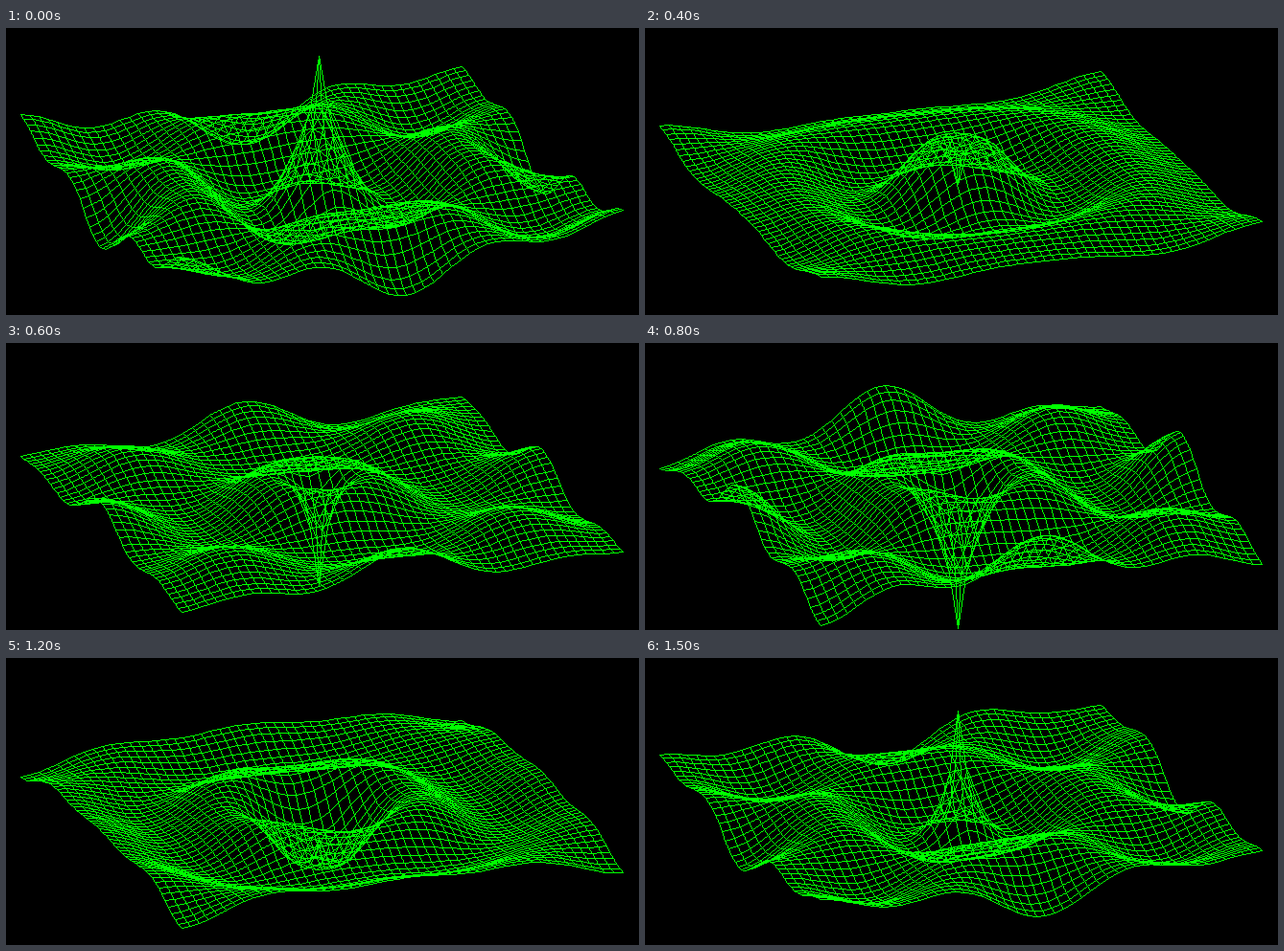
Write a matplotlib script that moves like this. It is 660 px wide and 300 px high and loops after 1600 ms.

```python
import numpy as np
import matplotlib.pyplot as plt
from matplotlib.animation import FuncAnimation

W, H = 660, 300
FRAMES, INTERVAL = 16, 100
N = 50                      # mesh points per side
CELL = 10                   # mesh spacing in pixels
CENTRE = (326, 163.5)       # screen position of the driven point
ANGLE = np.radians(20)      # both the turn and the tilt of the view
HEIGHT = 135
PHASE, STEP = 0.09, 0.37    # radians: start and advance per frame
K2 = 0.1471                 # squared wave number
LOSS_IN, LOSS_QUARTER = 0.0166, 0.037
SRC = (24, 25)


def driven_field(loss):
    """Complex amplitude of a damped square membrane driven at one point."""
    m = np.arange(N)
    modes = np.cos(np.pi * np.outer(m + 0.5, m) / N) * np.sqrt(2 / N)
    modes[:, 0] /= np.sqrt(2)
    lam = 2 - 2 * np.cos(np.pi * m / N)
    weights = np.outer(modes[SRC[0]], modes[SRC[1]])
    weights = weights / (lam[:, None] + lam[None, :] - K2 - 1j * loss)
    field = modes @ weights @ modes.T
    return HEIGHT * field / field[SRC]


# The part in phase with the drive rings across the whole square,
# the part a quarter turn later fades towards the edges.
in_phase = driven_field(LOSS_IN).real
quarter = driven_field(LOSS_QUARTER).imag

u, v = np.meshgrid(np.arange(N) - SRC[0], np.arange(N) - SRC[1], indexing="ij")
c, s = CELL * np.cos(ANGLE), CELL * np.sin(ANGLE)
tilt = np.sin(ANGLE)
base_x = CENTRE[0] + u * c + v * s
base_y = CENTRE[1] + tilt * (v * c - u * s)


def ends(grid):
    """Start and end values of every mesh segment."""
    start = np.concatenate([grid[:-1].ravel(), grid[:, :-1].ravel()])
    stop = np.concatenate([grid[1:].ravel(), grid[:, 1:].ravel()])
    return start, stop


def draw_mesh(x, y):
    """Rasterise the wireframe with one-pixel lines."""
    x0, x1 = ends(np.rint(x))
    y0, y1 = ends(np.rint(y))
    length = np.maximum(np.maximum(abs(x1 - x0), abs(y1 - y0)), 1)
    t = np.minimum(np.arange(length.max() + 1)[:, None] / length, 1)
    px = np.rint(x0 + t * (x1 - x0)).astype(int)
    py = np.rint(y0 + t * (y1 - y0)).astype(int)
    inside = (px >= 0) & (px < W) & (py >= 0) & (py < H)
    pixels = np.zeros((H, W, 3), np.uint8)
    pixels[py[inside], px[inside], 1] = 255
    return pixels


fig = plt.figure(figsize=(W / 100, H / 100), dpi=100, facecolor="black")
ax = fig.add_axes([0, 0, 1, 1])
ax.axis("off")
image = ax.imshow(np.zeros((H, W, 3), np.uint8), interpolation="nearest",
                  aspect="auto")


def update(frame):
    phase = PHASE + STEP * frame
    z = in_phase * np.cos(phase) + quarter * np.sin(phase)
    image.set_data(draw_mesh(base_x, base_y - z))
    return [image]


anim = FuncAnimation(fig, update, frames=FRAMES, interval=INTERVAL,
                     repeat=True, repeat_delay=0)
plt.show()
```
